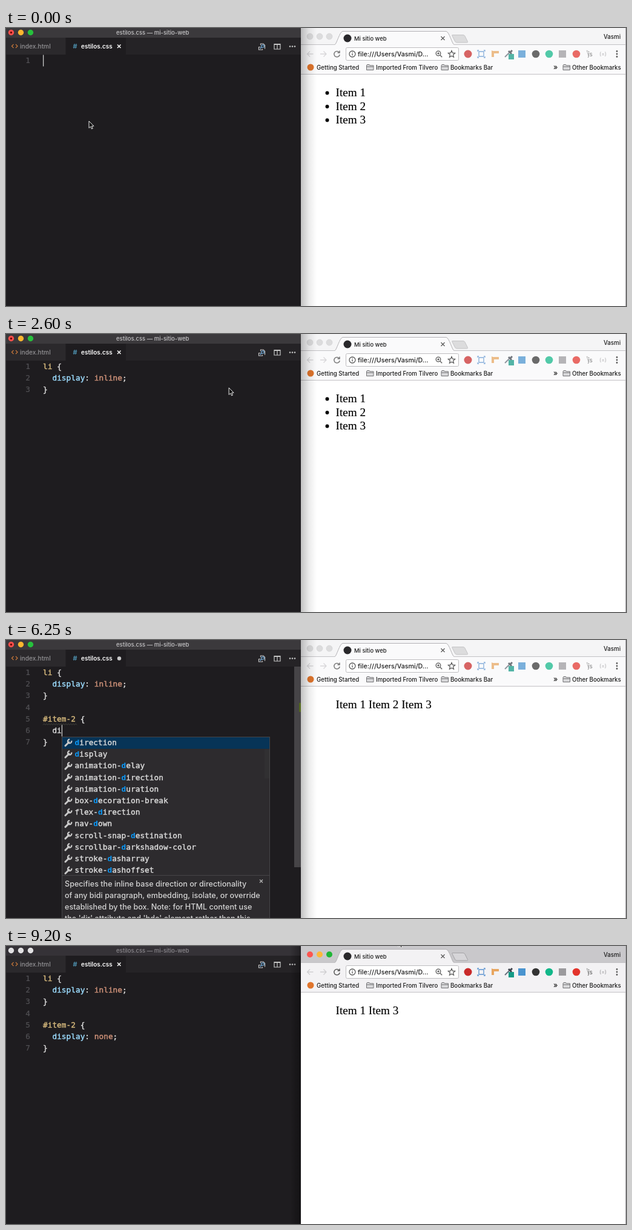
These frames come from a looping animation (1024x460 px, 9250 ms). An HTML page:

```html
<!DOCTYPE html>
<html lang="es">
<head>
<meta charset="utf-8">
<title>Mi sitio web</title>
<style>
html, body { margin: 0; width: 100%; height: 100%; overflow: hidden; background: #1e1c1f; }
svg { display: block; width: 1024px; height: 460px; }
text { white-space: pre; }
.ui { font-family: Inter, Roboto, sans-serif; font-size: 9.7px; font-weight: 500; fill: #1c1c1c; }
.mono { font-family: "DejaVu Sans Mono", monospace; font-size: 12.8px; color: #dcdcdc; stroke-width: .4px; }
.mono, .mono text, .mono tspan { fill: currentColor; stroke: currentColor; }
.page { font-family: "Liberation Serif", Times, serif; font-size: 19.2px; fill: #000; stroke: #000; stroke-width: .15px; }
.num { color: #504f53; text-anchor: end; stroke-width: .2px; }
.sel { color: #d7ba7d; }
.prop { color: #9cdcfe; }
.val { color: #ce9178; }
.hit { color: #0b97f5; font-weight: bold; stroke-width: 0; }
.note { font-size: 12.6px; fill: #d4d4d4; }
.line { fill: none; stroke: #5b5b5b; stroke-width: 1.3; }
.lite { fill: none; stroke: #c5c5c5; stroke-width: 1.2; }
/* window focus */
.titlebar { fill: #3b393c; }
.title { fill: #c6c5c7; }
.strip { fill: #f5f5f6; }
.bar { fill: #fafafb; }
.newtab { fill: #dcdcdd; stroke: #c4c4c6; }
.nav { opacity: .8; }
.ext { opacity: .72; }
.lights circle { fill: #dcdcdd; stroke: #cfcfd0; stroke-width: .6; }
.browser .titlebar { fill: #353237; }
.browser .title { fill: #8b888d; }
.browser .edLights circle { fill: #e2e1e3; }
.browser .dot { display: none; }
.browser .strip { fill: #c9c8cb; }
.browser .bar { fill: #f3f2f4; }
.browser .newtab { fill: #d6d5d8; stroke: #a3a2a5; }
.browser .nav, .browser .ext { opacity: 1; }
.browser .lights circle { stroke: none; }
.browser .lights circle:nth-child(1) { fill: #fc5550; }
.browser .lights circle:nth-child(2) { fill: #fdb83a; }
.browser .lights circle:nth-child(3) { fill: #1fb636; }
.browser .edShade, .editor .brShade { display: none; }
</style>
</head>
<body>
<svg id="stage" class="editor" viewBox="0 0 1024 460">
  <defs>
    <linearGradient id="right"><stop stop-color="#000" stop-opacity=".24"/><stop offset=".5" stop-color="#000" stop-opacity=".08"/><stop offset="1" stop-color="#000" stop-opacity="0"/></linearGradient>
    <linearGradient id="left"><stop stop-color="#000" stop-opacity="0"/><stop offset="1" stop-color="#000" stop-opacity=".35"/></linearGradient>
    <g id="wrench" fill="none" stroke="#c8c8c8">
      <path d="M-5 5L1-1" stroke-width="3" stroke-linecap="round"/>
      <path d="M5.2-3.4A3.2 3.2 0 1 1 2.2-5.6" stroke-width="2.2"/>
    </g>
    <g id="enum" fill="#2d2b2e" stroke="#d8903c" stroke-width="1.2">
      <path d="M0-5.5h6.5v5.5h-6.5zM2-3.5h3M2-1.8h3"/>
      <path d="M-6-1h7v6.5h-7zM-4 1.2h3M-4 3.2h3"/>
    </g>
    <g id="folder"><path d="M.5 2v7.5h11.5v-7.5h-6l-1-1.5h-3.5z" fill="#d9d9db" stroke="#727275"/><path d="M.5 4h11.5" stroke="#727275"/></g>
  </defs>

  <!-- code editor -->
  <rect width="487" height="460" fill="#1e1c1f"/>
  <rect class="titlebar" width="487" height="16"/>
  <rect y="16" width="487" height="28" fill="#252326"/>
  <rect x="1" y="16" width="97" height="28" fill="#2b292c"/>
  <rect x="99" y="16" width="99" height="28" fill="#1e1c1f"/>
  <g class="edLights">
    <circle cx="8.5" cy="7.5" r="4.7" fill="#fc4f4b"/><circle cx="24.5" cy="7.5" r="4.7" fill="#fdb62f"/><circle cx="40.5" cy="7.5" r="4.7" fill="#26c13c"/>
  </g>
  <circle class="dot" cx="8.5" cy="7.5" r="1.7" fill="#6b0a08"/>
  <g class="ui">
    <text class="title" x="182" y="11" style="font-size:9.5px">estilos.css — mi-sitio-web</text>
    <text x="23" y="34" style="font-size:10.2px;fill:#929194">index.html</text>
    <text x="124" y="34" style="font-size:10px;font-weight:600;fill:#fff">estilos.css</text>
    <text x="110.5" y="34" style="font-size:11px;font-weight:600;fill:#519aba">#</text>
  </g>
  <path d="M12.5 27l-3 3 3 3M16 27l3 3-3 3" fill="none" stroke="#c9783a" stroke-width="1.2"/>
  <path id="tabClose" d="M184 27.5l5.5 5.5m0-5.5l-5.5 5.5" stroke="#eee" stroke-width="1.7"/>
  <circle id="tabDirty" cx="187" cy="30.5" r="3.2" fill="#c8c8c8"/>
  <g class="lite">
    <path d="M420.5 31.500h-3v4.500h6v-1.500M420.500 28.500v-2.500h4.500l2.500 2.500v6"/>
    <circle cx="424" cy="30" r="2.2" stroke="#6fa8d6"/><path d="M422.500 31.500l-3 3" stroke="#6fa8d6"/>
    <path d="M443 26.5h10v8.5h-10zM448 26.5v8.5M443 27.5h10"/>
  </g>
  <g fill="#c5c5c5"><circle cx="469" cy="30.5" r="1.3"/><circle cx="473" cy="30.5" r="1.3"/><circle cx="477" cy="30.5" r="1.3"/></g>
  <g id="scroll"><rect id="thumb" x="476" y="44" width="11" fill="#464447"/><rect id="mark" x="484" width="3" height="15" fill="#55691f"/></g>
  <g id="code" class="mono"></g>
  <rect id="caret" width="1.3" height="19" fill="#c9c9c9"/>
  <g id="popup"></g>

  <!-- web browser -->
  <rect x="487" width="537" height="460" fill="#fff"/>
  <rect class="strip" x="487" width="537" height="28"/>
  <rect class="bar" x="487" y="27" width="537" height="49"/>
  <path d="M487 27.5H543M740 27.5H1024M487 76.5H1024" stroke="#c2c1c4"/>
  <path class="bar" d="M543 28C547 27 550 6 556 6H727C733 6 736 27 740 28Z"/>
  <path d="M543 27.5C546 27 551 6 556 5.5H727C732 6 737 27 740 27.5" fill="none" stroke="#b3b2b5"/>
  <path class="newtab" d="M737 11.5h18q2 0 3 2l4.5 9q.5 1.5-1 1.5h-17q-2 0-3-2l-4.5-9q-.5-1.5 0-1.5z"/>
  <g class="lights"><circle cx="502" cy="14" r="5"/><circle cx="518" cy="14" r="5"/><circle cx="534" cy="14" r="5"/></g>
  <circle cx="564" cy="17" r="6.5" fill="#29282b"/>
  <path class="line" d="M718.5 14l6 6m0-6l-6 6"/>
  <g class="nav line">
    <path d="M507.5 43h-10m4.5-4.5l-4.5 4.5 4.5 4.5M519 43h10m-4.5-4.5l4.5 4.5-4.5 4.5" stroke="#cfced1"/>
    <path d="M550.5 40.5a4.7 4.7 0 1 0 .7 3.5M551 37.5v3.5h-3.5" stroke-width="1.5"/>
  </g>
  <rect x="561.5" y="32.5" width="186" height="21" rx="2" fill="#fff" stroke="#bdbcbf"/>
  <g class="line">
    <circle cx="572" cy="43" r="5"/><path d="M572 42v3.5M572 39.7v1.3"/>
    <circle cx="714" cy="42" r="3.8"/><path d="M717 45l3.2 3.2M712.3 42h3.4M714 40.3v3.4"/>
    <path d="M736 37.5l1.6 3.7 4 .4-3 2.7.9 3.9-3.5-2-3.5 2 .9-3.9-3-2.7 4-.4z"/>
  </g>
  <g class="ext">
    <circle cx="763" cy="43" r="6.5" fill="#c92a2a"/>
    <path d="M781 39h8v8h-8zM779 39v-2h2M789 37h2v2M791 47v2h-2M781 49h-2v-2" fill="none" stroke="#5b93cf" stroke-width="1.3"/>
    <path d="M802 37v11h4v-6h8v-4h-10" fill="#e8a660"/>
    <path d="M824 48l7-7" stroke="#68717d" stroke-width="2"/><path d="M830 38l5 5M832 41l4-4" stroke="#3d434c" stroke-width="3"/>
    <rect x="830" y="43" width="9" height="9" fill="#149a86"/>
    <rect x="846" y="37" width="12" height="12" fill="#4a94cf"/>
    <circle cx="875" cy="43" r="6.3" fill="#333"/>
    <circle cx="897" cy="43" r="6.3" fill="#12b789"/>
    <rect x="913" y="37" width="12" height="12" fill="#9b9a9d"/>
    <circle cx="942" cy="43" r="6.3" fill="#e3342c"/>
    <path d="M959 37l3 9m-3-9l5 3" stroke="#aaa"/>
    <text class="ui" x="961" y="47" style="fill:#666">js</text>
    <text class="ui" x="980" y="46" style="font-size:8.5px;fill:#a4a3a6">(=)</text>
  </g>
  <g fill="#5b5b5b"><circle cx="1009" cy="38.5" r="1.4"/><circle cx="1009" cy="43" r="1.4"/><circle cx="1009" cy="47.5" r="1.4"/></g>
  <circle cx="503" cy="65" r="5.5" fill="#e0752c"/>
  <use href="#folder" x="595" y="60"/><use href="#folder" x="718.5" y="60"/><use href="#folder" x="919.5" y="60"/>
  <g class="ui">
    <text x="575" y="20.5" style="font-size:9.4px">Mi sitio web</text>
    <text x="987" y="18">Vasmi</text>
    <text x="581" y="47" style="font-size:10.7px">file:///Users/Vasmi/D…</text>
    <text x="513" y="68.5">Getting Started</text>
    <text x="611" y="68.5">Imported From Tilvero</text>
    <text x="734" y="68.5">Bookmarks Bar</text>
    <text x="904" y="68.5" style="font-size:12px">»</text>
    <text x="935" y="68.5">Other Bookmarks</text>
  </g>
  <g id="page" class="page"></g>
  <path d="M1023.5 0V460" stroke="#a9a8ab"/>
  <rect class="edShade" x="487" width="26" height="460" fill="url(#right)"/>
  <rect class="brShade" x="469" width="18" height="460" fill="url(#left)"/>

  <path id="pointer" d="M0 0V11.5L2.7 9L4.4 13L6.3 12.2L4.6 8.3H8Z" fill="#111" stroke="#fff" stroke-width=".9"/>
</svg>
<script>
const LOOP = 9250, ROW = 19.2, CHAR = 7.7;
const $ = id => document.getElementById(id);

// Text states; "|" is the caret, the third entry names the popup
const li = s => `li {\n  ${s}\n}`;
const more = s => li('display: inline;') + s;
const item = s => more(`\n\n#item-2 {\n  ${s}\n}`);
const edits = [
  [0, '|'], [250, 'l|'], [350, 'li|'], [500, 'li |'], [600, 'li {|}'], [800, li('|')],
  [1050, li('d|')], [1150, li('di|'), 'props'], [1350, li('display: |')],
  [1500, li('display: i|')], [1600, li('display: in|')], [1700, li('display: inl|'), 'values'],
  [1900, li('display: inline|')], [2000, li('display: inline;|')],
  [3600, more('|')], [3850, more('\n|')], [4050, more('\n\n|')],
  ...[...'#item-2'].map((c, i) => [4250 + i * 100, more('\n\n' + '#item-2'.slice(0, i + 1) + '|')]),
  [5000, more('\n\n#item-2 |')], [5150, more('\n\n#item-2 {|}')], [5500, item('|')],
  [6100, item('d|')], [6200, item('di|'), 'props'], [6450, item('display: |')],
  [6600, item('display: n|')], [6700, item('display: no|')],
  [6800, item('display: none|')], [6900, item('display: none;|')]
];
const popups = {
  values: {
    x: 127, w: 343, icon: 'enum',
    rows: ['[inl]ine', '[inl]ine-block', '[inl]ine-flex', '[inl]ine-table', '[in]itia[l]',
      '-ms-[inl]ine-grid', '-webkit-[inl]ine-box', '-webkit-[inl]ine-flex'],
    note: ['The element generates an inline-level box.']
  },
  props: {
    x: 92, w: 343, icon: 'wrench',
    rows: ['[d]irection', '[d]isplay', 'animation-[d]elay', 'animation-[d]irection', 'animation-[d]uration',
      'box-[d]ecoration-break', 'flex-[d]irection', 'nav-[d]own', 'scroll-snap-[d]estination',
      'scrollbar-[d]arkshadow-color', 'stroke-[d]asharray', 'stroke-[d]ashoffset'],
    note: ['Specifies the inline base direction or directionality', 'of any bidi paragraph, embedding, isolate, or override',
      'established by the box. Note: for HTML content use', "the 'dir' attribute and 'bdo' element rather than this", 'property.']
  }
};
// Pointer runs: time, x, y; hidden between runs
const runs = [
  [[0, 137, 154], [250, 137, 154]],
  [[2300, 137, 154], [2850, 542, 40], [3050, 542, 40], [3400, 184, 164], [3580, 72, 88], [3850, 72, 88]],
  [[7300, 72, 88], [7950, 542, 40], [8200, 542, 40], [8750, 648, 141], [8950, 648, 141], [9200, 648, -10], [9250, 648, -18]]
];

const span = (cls, s) => s ? `<tspan class="${cls}">${s}</tspan>` : '';
const within = (t, ...spans) => spans.some(([a, b]) => t >= a && t < b);

function paint(line) {
  const decl = line.match(/^( +)(display)(: )(inline|none)?(.*)$/);
  if (decl) return decl[1] + span('prop', decl[2]) + decl[3] + span('val', decl[4]) + decl[5];
  return line.replace(/^(#?[a-z][\w-]*|#)/, s => span('sel', s));
}

function wave(x, y, w) {
  let d = `M${x} ${y}`;
  for (let i = 0; i < w; i += 4) d += 'l2-2l2 2';
  return `<path d="${d}" fill="none" stroke="#55594f" stroke-width=".7"/>`;
}

function drawCode(text) {
  const lines = text.replace('|', '').split('\n');
  let out = '';
  lines.forEach((s, i) => {
    const y = 58 + i * ROW;
    out += `<text class="num" x="40" y="${y}">${i + 1}</text><text x="61" y="${y}">${paint(s)}</text>`;
  });
  const before = text.split('|')[0].split('\n');
  const row = before.length - 1;
  const warn = /\{\n  (di?)?\n\}$/.test(text.replace('|', ''));
  if (warn) out += row > 2 ? wave(61, 140.5, 54) : wave(61, 63.5, 15);
  $('code').innerHTML = out;
  $('caret').setAttribute('x', 61 + before[row].length * CHAR);
  $('caret').setAttribute('y', 44.5 + row * ROW);
  $('thumb').setAttribute('height', 388 - 14 * (lines.length - 3));
  $('mark').setAttribute('y', row > 2 ? 104 : 46);
  $('mark').style.display = warn ? '' : 'none';
  return row;
}

function drawPopup(p, row) {
  if (!p) return $('popup').innerHTML = '';
  const y = Math.floor(64 + row * ROW), listH = p.rows.length * ROW;
  const h = Math.round(listH + p.note.length * ROW + 7), split = Math.floor(y + listH) - .5;
  let out = `<rect x="${p.x + .5}" y="${y + .5}" width="${p.w}" height="${h}" fill="#2d2b2e" stroke="#464548"/>
    <rect x="${p.x + 1}" y="${y + 1}" width="${p.w - 1}" height="19" fill="#073457"/>`;
  if (p.rows.length > 8) out += `<rect x="${p.x + 335}" y="${y + 21}" width="8" height="48" fill="#313032"/>`;
  p.rows.forEach((s, i) => {
    const top = y + i * ROW;
    const label = s.replace(/\[(\w+)\]/g, (_, hit) => span('hit', hit));
    out += `<use href="#${p.icon}" x="${p.x + 11}" y="${top + 10}"/><text class="mono" x="${p.x + 21.5}" y="${top + 14}">${label}</text>`;
  });
  out += `<path d="M${p.x} ${split}h${p.w}" stroke="#464548"/>
    <path d="M${p.x + 327} ${split + 7}l5 5m0-5l-5 5" stroke="#b5b5b5" stroke-width="1.3"/>`;
  p.note.forEach((s, i) => {
    out += `<text class="ui note" x="${p.x + 5}" y="${split + 18 + i * ROW}">${s}</text>`;
  });
  $('popup').innerHTML = out;
}

function drawPage(mode) {
  const row = (s, y) => `<text x="544.5" y="${y}">${s}</text>`;
  $('page').innerHTML = mode === 0
    ? [1, 2, 3].map(n => `<circle cx="530.5" cy="${85 + n * 22.5}" r="2.9"/>` + row('Item ' + n, 90.5 + n * 22.5)).join('')
    : row(mode === 1 ? 'Item 1 Item 2 Item 3' : 'Item 1 Item 3', 113);
}

function movePointer(t) {
  const run = runs.find(r => t >= r[0][0] && t < r[r.length - 1][0]);
  $('pointer').style.display = run ? '' : 'none';
  if (!run) return;
  const i = run.findIndex(k => k[0] > t);
  const [t0, x0, y0] = run[i - 1], [t1, x1, y1] = run[i];
  let k = (t - t0) / (t1 - t0);
  k = k * k * (3 - 2 * k);
  $('pointer').setAttribute('transform', `translate(${x0 + (x1 - x0) * k} ${y0 + (y1 - y0) * k})`);
}

let lastEdit = null, lastPage = -1;
function render(t) {
  const edit = edits.filter(e => e[0] <= t).pop();
  if (edit !== lastEdit) {
    lastEdit = edit;
    drawPopup(popups[edit[2]], drawCode(edit[1]));
  }
  const mode = t < 3050 ? 0 : t < 8200 ? 1 : 2;
  if (mode !== lastPage) drawPage(lastPage = mode);

  const away = within(t, [2950, 3600], [8050, LOOP]);
  $('stage').setAttribute('class', away ? 'browser' : 'editor');
  $('caret').style.display = !away && (t - edit[0]) % 1000 < 500 ? '' : 'none';

  const dirty = within(t, [250, 2250], [3850, 7050]);
  $('tabDirty').style.display = dirty ? '' : 'none';
  $('tabClose').style.display = dirty ? 'none' : '';

  const end = t < 3000 ? 1450 : 7450;
  const shown = within(t, [800, 1450], [3850, 7450]);
  $('scroll').style.opacity = shown ? Math.min(1, (end - t) / 250) : 0;
  movePointer(t);
}

const start = performance.now();
function tick() {
  render((performance.now() - start) % LOOP);
  requestAnimationFrame(tick);
}
tick();
</script>
</body>
</html>
```
